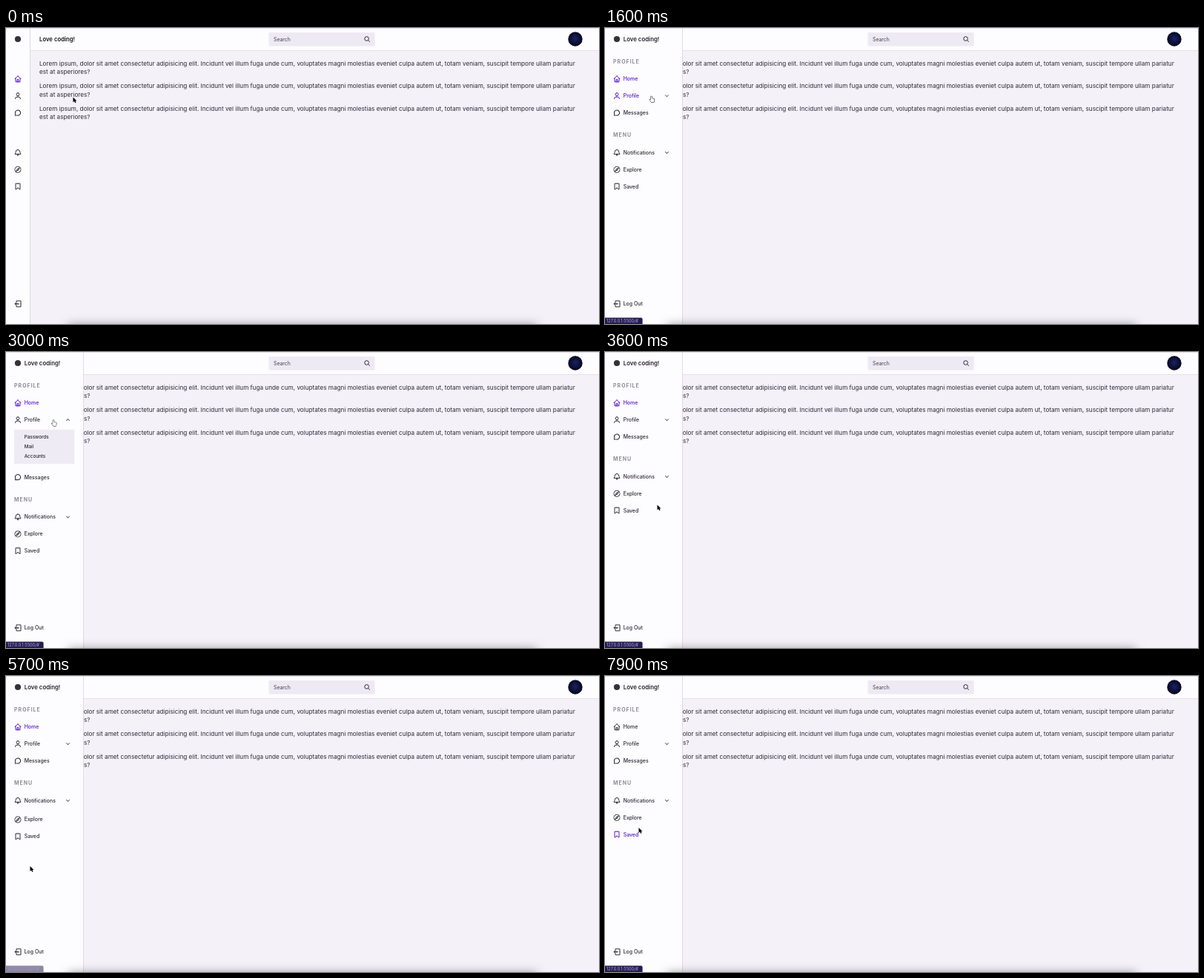
Recreate the animation shown at these times as an HTML page with a canvas. Size 800x400 px, loop 8 s.

```html
<!DOCTYPE html>
<html lang="en">
<head>
<meta charset="utf-8">
<title>Sidebar menu</title>
<style>
  html, body { margin: 0; width: 100%; height: 100%; overflow: hidden; background: #f4f1f9; }
  canvas { display: block; width: 800px; height: 400px; }
</style>
</head>
<body>
<canvas id="stage"></canvas>
<script>
const LOOP = 8000, STEP = 100;
const INK = '#29262f', PURPLE = '#5312c4', GREY = '#8f8c95', PANEL = '#fdfcfe', SOFT = '#eeebf4';
const ROW = 22.9, SUBROW = 13.2, TRAVEL = 300;
const canvas = document.getElementById('stage');
const ctx = canvas.getContext('2d');
const dpr = window.devicePixelRatio || 1;
canvas.width = 800 * dpr;
canvas.height = 400 * dpr;

const LOREM = [
  'Lorem ipsum, dolor sit amet consectetur adipisicing elit. Incidunt vel illum fuga unde cum, ' +
  'voluptates magni molestias eveniet culpa autem ut, totam veniam, suscipit tempore ullam pariatur',
  'est at asperiores?'
];

// Right half of each icon; the left half is its mirror image
const halves = {
  home: 'M0 -4L4 0M3 -1V4H0M1 4V1H0',
  user: 'M0 -4A2 2 0 0 1 0 0M0 1.4H1Q3.5 1.4 3.5 4',
  chat: 'M0 -5L1.5 -3.2A3.5 3.5 0 0 1 0 3.5',
  bell: 'M0 -4Q3 -4 3 0L4 2H0M1 2Q1 4 0 4',
  compass: 'M0 -4A4 4 0 0 1 0 4M0 -2.6L1 0L0 2.6',
  bookmark: 'M0 -4H3V4L0 2',
  logout: 'M0 1V-4L1.5 -2.5M2 -2H4V4H0',
  chevron: 'M0 1L2 -1'
};
const turns = { chat: -135, compass: 45, logout: -90 };
const arrow = new Path2D('M0 0V7L1.5 5.5L3 8L4 7L3 5H5Z');
const hand = new Path2D('M-.7 0H.7V3L4 3.5L3.5 8H0L-2.5 4.5H-.7Z');

const sections = [
  { title: 'PROFILE', rows: [
    { icon: 'home', label: 'Home', on: 0, off: 7800 },
    { icon: 'user', label: 'Profile', on: 1600, off: 3000, items: ['Passwords', 'Mail', 'Accounts'] },
    { icon: 'chat', label: 'Messages' }
  ] },
  { title: 'MENU', rows: [
    { icon: 'bell', label: 'Notifications', on: 4350, off: 5400, items: ['Blocked', 'Silenced', 'Publish', 'Program'], plainIcon: true },
    { icon: 'compass', label: 'Explore' },
    { icon: 'bookmark', label: 'Saved', on: 7800, off: LOOP }
  ] }
];

// Places where the pointer rests, and when it gets there
const stops = [
  { t: 0, x: 90.5, y: 93.5 },
  { t: 300, x: 47.5, y: 79 },
  { t: 850, x: 21, y: 71.5, link: true },
  { t: 1500, x: 62.5, y: 92.3, link: true },
  { t: 2600, x: 54, y: 139 },
  { t: 3000, x: 64, y: 92, link: true },
  { t: 3600, x: 70.5, y: 206.5 },
  { t: 4300, x: 67, y: 168, link: true },
  { t: 4900, x: 66.5, y: 176.5 },
  { t: 5300, x: 66, y: 168, link: true },
  { t: 5700, x: 32.5, y: 257 },
  { t: 6600, x: 42, y: 192 },
  { t: 7800, x: 45.5, y: 205 }
];

const clamp = v => Math.max(0, Math.min(1, v));
const ease = x => 1 - (1 - clamp(x)) ** 2.3;
const pulse = (t, on, off, span) => ease((t - on) / span) - ease((t - off) / span);

function rect(x, y, w, h, fill, r = 0) {
  ctx.fillStyle = fill;
  ctx.beginPath();
  ctx.roundRect(x, y, w, h, r);
  ctx.fill();
}

function disc(x, y, r, fill) {
  ctx.fillStyle = fill;
  ctx.beginPath();
  ctx.arc(x, y, r, 0, 7);
  ctx.fill();
}

function text(str, x, y, size, weight = 400, fill = INK, spacing = 0) {
  ctx.font = `${weight} ${size}px Inter, "Open Sans", sans-serif`;
  ctx.letterSpacing = spacing + 'px';
  ctx.fillStyle = fill;
  ctx.fillText(str, x, y);
}

function icon(name, x, y, color = INK, flip = 1) {
  const half = new Path2D(halves[name]);
  ctx.save();
  ctx.translate(x, y);
  ctx.rotate((turns[name] || 0) * Math.PI / 180);
  ctx.scale(1, flip);
  ctx.strokeStyle = color;
  ctx.lineWidth = .95;
  ctx.lineJoin = ctx.lineCap = 'round';
  ctx.stroke(half);
  ctx.scale(-1, 1);
  ctx.stroke(half);
  ctx.restore();
}

function drawPage() {
  rect(0, 0, 800, 400, '#f4f1f9');
  rect(0, 0, 800, 30, PANEL);
  rect(0, 30, 800, .8, '#dfdce5');
  text('Love coding!', 45, 17.9, 7.75, 600, '#17151b');

  rect(354.5, 6, 143, 18.5, '#eeeaf4', 1);
  text('Search', 361, 17.6, 6.9, 400, '#45414c');
  ctx.strokeStyle = INK;
  ctx.lineWidth = 1;
  ctx.beginPath();
  ctx.arc(486.6, 14.5, 2.8, 0, 7);
  ctx.moveTo(488.7, 16.6);
  ctx.lineTo(490.8, 18.7);
  ctx.stroke();

  const glow = ctx.createRadialGradient(768, 14, 1, 768, 15, 9.8);
  glow.addColorStop(0, '#17205f');
  glow.addColorStop(1, '#05051c');
  disc(768, 15, 9.7, glow);

  for (let i = 0; i < 3; i++)
    LOREM.forEach((line, k) => text(line, 45, 50.5 + i * 30.5 + k * 11.5, 8.18, 400, '#2e2a35'));
}

// Draws the open part of a submenu; returns how far the rows below move down
function submenu(items, y, w, open) {
  const shift = (items.length * SUBROW + 15) * open;
  const h = shift - 8;
  if (h > 0) {
    ctx.save();
    ctx.beginPath();
    ctx.rect(11, y + 13, w - 23, h);
    ctx.clip();
    rect(11, y + 13, w - 23, h, SOFT);
    items.forEach((s, i) => text(s, 24.7, y + 25.2 + i * SUBROW, 6.3, 500));
    ctx.restore();
  }
  return shift;
}

function drawSidebar(t) {
  const p = ease((t - 620) / 500);
  const w = 32.5 + 72 * p;
  const faded = draw => {
    ctx.globalAlpha = clamp(p * 1.2);
    draw();
    ctx.globalAlpha = 1;
  };

  ctx.save();
  ctx.beginPath();
  ctx.rect(0, 0, w, 400);
  ctx.clip();
  rect(0, 0, w, 400, PANEL);
  disc(16, 15, 4.1, '#343138');
  faded(() => text('Love coding!', 24.7, 17.8, 7.85, 600));

  let y = 45;
  for (const { title, rows } of sections) {
    faded(() => text(title, 11, y + 2.6, 7, 700, GREY, 1));
    y += 23.8;
    for (const row of rows) {
      const color = t >= row.on && t < row.off ? PURPLE : INK;
      icon(row.icon, 16, y, row.plainIcon ? INK : color);
      faded(() => text(row.label, 24.7, y + 2.4, 6.95, 500, color));
      if (row.items) {
        const open = pulse(t, row.on, row.off, 400);
        faded(() => icon('chevron', w - 21, y, color, 1 - 2 * open));
        y += submenu(row.items, y, w, open);
      }
      y += ROW;
    }
    y += 7.1;
  }

  icon('logout', 16, 372.8);
  faded(() => text('Log Out', 24.7, 375.2, 6.95, 500));
  ctx.restore();
  rect(w - .5, 0, .8, 400, '#d8d4df');
}

function drawEdges(t) {
  ctx.save();
  ctx.shadowColor = 'rgba(0,0,0,.4)';
  ctx.shadowBlur = 13 * dpr;
  ctx.fillStyle = '#000';
  ctx.fillRect(84, 401, 632, 12);
  ctx.restore();

  const hint = pulse(t, 900, 2600, 200) + pulse(t, 2800, 5650, 200) + pulse(t, 6300, LOOP, 200);
  ctx.globalAlpha = clamp(hint);
  rect(0, 391.4, 50.6, 8.6, '#251c52', [0, 2, 0, 0]);
  text('127.0.0.1:5500/#', 2, 397.9, 5.7, 400, '#b5abdf');
  ctx.globalAlpha = 1;

  rect(0, 0, 800, .7, '#dddbe0');
}

function drawPointer(t) {
  const next = stops.findIndex(s => s.t > t);
  const last = stops.at(next < 0 ? -1 : next - 1);
  const goal = next < 0 ? last : stops[next];
  const p = ease((t - goal.t + TRAVEL) / TRAVEL);
  const shape = last.link ? hand : arrow;
  ctx.save();
  ctx.translate(last.x + (goal.x - last.x) * p, last.y + (goal.y - last.y) * p);
  ctx.lineJoin = 'round';
  ctx.lineWidth = 1;
  ctx.strokeStyle = last.link ? '#111' : '#fff';
  ctx.fillStyle = last.link ? '#fff' : '#000';
  ctx.stroke(shape);
  ctx.fill(shape);
  ctx.restore();
}

function frame() {
  const t = Math.floor(performance.now() % LOOP / STEP) * STEP;
  ctx.setTransform(dpr, 0, 0, dpr, 0, 0);
  drawPage();
  drawSidebar(t);
  drawEdges(t);
  drawPointer(t);
  requestAnimationFrame(frame);
}
frame();
</script>
</body>
</html>
```
